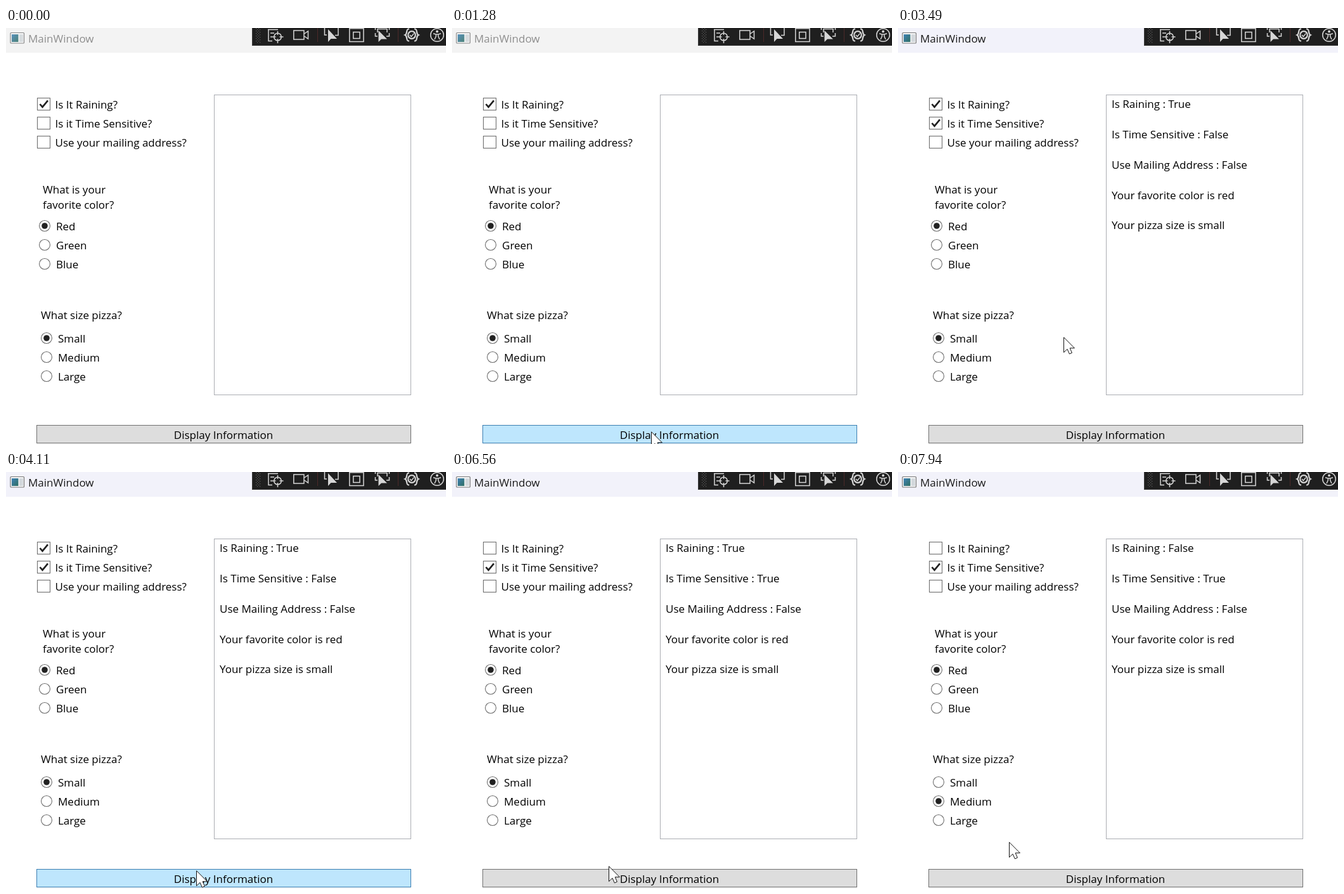
Animation, 694 px wide and 656 px high, one loop 8000 ms. Source, as an HTML page:

```html
<!DOCTYPE html>
<html lang="en">
<head>
<meta charset="utf-8">
<title>Window demo</title>
<style>
  html, body { margin: 0; width: 100%; height: 100%; overflow: hidden; background: #fff; }
  svg { display: block; width: 694px; height: 656px; }
  text { font: 17px "Open Sans", "Noto Sans", sans-serif; fill: #000; white-space: pre; }
  .line { fill: none; stroke: #d6d6d6; stroke-width: 1.5; }
  .bold { stroke-width: 2.2; }
  .solid { fill: #d6d6d6; }
  .box { fill: #fff; stroke: #707070; stroke-width: 1.1; }
  .hover .box { fill: #f3f9ff; stroke: #5593ff; }
  .press .box { fill: #d9ecff; stroke: #3c77dd; }
  .tick { fill: none; stroke: #212121; stroke-width: 2.7; }
  .dot { fill: #212121; }
  #button rect { fill: #ddd; stroke: #707070; }
  #button.hover rect { fill: #bee6fd; stroke: #3c7fb1; }
  #button.press rect { fill: #c4e5f6; stroke: #2c628b; }
</style>
</head>
<body>
<svg viewBox="0 0 694 656">
  <defs>
    <linearGradient id="pane" x1="0" y1="0" x2="1" y2="1">
      <stop offset="0" stop-color="#3f82b5"/><stop offset="1" stop-color="#2f6e62"/>
    </linearGradient>
    <pattern id="grip" width="4" height="4" patternUnits="userSpaceOnUse" x="394" y="0">
      <rect width="1.2" height="1.2" fill="#5c5c5c"/><rect x="2" y="2" width="1.2" height="1.2" fill="#5c5c5c"/>
    </pattern>
  </defs>
  <rect width="694" height="656" fill="#fff"/>
  <rect id="bar" width="694" height="39"/>
  <g id="icon">
    <rect x="7" y="7.5" width="21.5" height="16.5" rx="1" fill="#fafafa" stroke="#777" stroke-width="1.2"/>
    <rect x="9" y="10" width="10.5" height="12" fill="url(#pane)"/>
    <rect x="21" y="10" width="6" height="12" fill="#d3d8dc"/>
  </g>
  <text id="title" x="35" y="23">MainWindow</text>

  <g id="tools">
    <rect x="388.5" y="-1" width="310" height="28.5" fill="#1f1f1f" stroke="#3a3a3a"/>
    <rect x="394" width="8" height="24" fill="url(#grip)"/>
    <path d="M491.5 0V22M618.5 0V22" stroke="#4c2929"/>
    <path class="line" d="M413 2.5H429M414 2V20.5H420M417 8H423M417 14H420M428.5 5V11M428.5 17V24M419.5 14H425.5M431.5 14H437.5"/>
    <circle class="line" cx="428.5" cy="14" r="5.8"/>
    <path class="line" d="M453.8 4H470V18H453.8ZM470.5 9L476.5 5V17L470.5 13"/>
    <path class="line" d="M506 11H502.5V0M524 0V11.5H519"/>
    <path class="solid" d="M508 2V22L512.5 17H522Z"/>
    <path class="line" d="M541.8 .8H564V21.5H541.8ZM547.8 6.5H558V16.5H547.8Z"/>
    <path class="line" d="M582.5 0V3M582.5 8V13H586M604.5 0V3M604.5 8V13H600M586 7V1.5H601V7"/>
    <path class="solid" d="M587.5 4V22L592 17.5H601Z"/>
    <path class="line bold" d="M636 1.5C630 1 634 9 629.5 11C634 13 630 21 636 20.5M644 1.5C650 1 646 9 650.5 11C646 13 650 21 644 20.5"/>
    <circle class="line bold" cx="640" cy="11" r="5.8"/>
    <path class="line" d="M637 11L639.3 13.5L643.3 8.6"/>
    <circle class="line" cx="680" cy="11" r="10.3"/>
    <circle class="solid" cx="680" cy="5.5" r="1.9"/>
    <path class="line" d="M674 8.7L678.3 10V13L676 18M686 8.7L681.7 10V13L684 18M678 10H682"/>
  </g>

  <rect x="328.5" y="105.5" width="310" height="473" fill="#fff" stroke="#abadb3"/>
  <g id="output"></g>
  <text x="58" y="261">What is your</text>
  <text x="58" y="285">favorite color?</text>
  <text x="55" y="459">What size pizza?</text>
  <g id="options"></g>
  <g id="button">
    <rect x="48.5" y="626.5" width="590" height="28"/>
    <text x="343" y="648" text-anchor="middle">Display Information</text>
  </g>
  <path id="cursor" fill="#fff" stroke="#111" d="M.5 .8V24.6L6 19.4L9.4 27L13.4 25.2L10.2 17.8H17.4Z"/>
</svg>
<script>
const LOOP = 8000, STEP = 75, ROW = 30;
const $ = id => document.getElementById(id);

function add(parent, tag, attrs, text) {
  const el = document.createElementNS("http://www.w3.org/2000/svg", tag);
  for (const k in attrs) el.setAttribute(k, attrs[k]);
  if (text) el.textContent = text;
  return parent.appendChild(el);
}

// Where the pointer goes: x, y, time it arrives, time it leaves
const stops = [
  { x: 500, y: 130, at: 440 },
  { x: 314, y: 636, at: 1280, until: 1890 },
  { x: 266, y: 559, at: 2050 },
  { x: 153, y: 169, at: 2350, until: 2580 },
  { x: 156, y: 152, at: 2900, until: 3070 },
  { x: 261, y: 487, at: 3490 },
  { x: 300, y: 628, at: 3880, until: 4800 },
  { x: 190, y: 439, at: 4880 },
  { x: 107, y: 110, at: 5570, until: 5760 },
  { x: 247, y: 621, at: 6560 },
  { x: 254, y: 631, at: 6800, until: 7000 },
  { x: 129, y: 510, at: 7560, until: 7710 },
  { x: 175, y: 583, at: 7940 }
];

function pointer(t) {
  const i = stops.findLastIndex(s => s.at <= t);
  if (i < 0) return null;
  const a = stops[i], b = stops[i + 1], leave = a.until ?? a.at;
  if (!b || t < leave) return [a.x, a.y];
  const n = Math.max(1, Math.round((b.at - leave) / STEP));
  const p = Math.floor((t - leave) / (b.at - leave) * n) / n;
  return [a.x + (b.x - a.x) * p, a.y + (b.y - a.y) * p];
}

function option(round, x, y, textX, label) {
  const g = add($("options"), "g", {});
  let mark;
  if (round) {
    add(g, "circle", { class: "box", cx: x, cy: y, r: 8.5 });
    mark = add(g, "circle", { class: "dot", cx: x, cy: y, r: 4.8 });
  } else {
    add(g, "rect", { class: "box", x: x - 10, y: y - 9.5, width: 20, height: 19 });
    mark = add(g, "path", { class: "tick", d: `M${x - 6} ${y}l4 4.7l8.5 -10.3` });
  }
  const text = add(g, "text", { x: textX, y: Math.floor(y + 7) }, label);
  const right = textX + text.getComputedTextLength();
  return { g, mark, area: [x - 10, y - 12, right, y + 12] };
}

const group = (round, x, y, textX, ...labels) =>
  labels.map((label, i) => option(round, x, y + i * ROW, textX, label));

const checks = group(false, 59.5, 120, 77.5, "Is It Raining?", "Is it Time Sensitive?", "Use your mailing address?");
const colors = group(true, 61, 312, 79, "Red", "Green", "Blue");
const sizes = group(true, 64, 489, 82, "Small", "Medium", "Large");
const options = [...checks, ...colors, ...sizes];
const lines = Array.from({ length: 5 }, (_, i) =>
  add($("output"), "text", { x: 337, y: Math.round(126 + i * 47.85) }));

// What is chosen at a given time
const chosen = t => ({ checks: [t < 5720, t >= 3070, false], color: 0, size: t < 7860 ? 0 : 1 });

// Each release of the button prints the choices made so far
const clicks = [1730, 4490, 6950], HOLD = 150;
const yes = on => on ? "True" : "False";

function report(t) {
  const last = clicks.findLast(c => c <= t);
  if (!last) return [];
  const { checks: [rain, time, mail], color, size } = chosen(last);
  return [
    "Is Raining : " + yes(rain),
    "Is Time Sensitive : " + yes(time),
    "Use Mailing Address : " + yes(mail),
    "Your favorite color is " + ["red", "green", "blue"][color],
    "Your pizza size is " + ["small", "medium", "large"][size]
  ];
}

const inside = (p, [l, t, r, b]) => p && p[0] >= l && p[0] <= r && p[1] >= t && p[1] <= b;
const setState = (el, hover, press) => el.setAttribute("class", press ? "press" : hover ? "hover" : "");

function draw(t) {
  const tip = pointer(t), now = chosen(t);
  const active = t >= clicks[0] - HOLD;
  $("cursor").style.display = tip ? "" : "none";
  if (tip) $("cursor").setAttribute("transform", `translate(${tip.map(Math.round)})`);
  $("bar").style.fill = active ? "#f2f2fa" : "#f3f3f3";
  $("title").style.fill = active ? "#1a1a1a" : "#8e8e8e";
  $("icon").style.opacity = active ? 1 : .85;

  setState($("button"), inside(tip, [48, 626, 639, 655]), clicks.some(c => t >= c - HOLD && t < c));
  for (const o of options) setState(o.g, inside(tip, o.area), o === checks[1] && t >= 2900 && t < 3070);

  const show = (o, on) => o.mark.style.display = on ? "" : "none";
  checks.forEach((o, i) => show(o, now.checks[i]));
  colors.forEach((o, i) => show(o, i === now.color));
  sizes.forEach((o, i) => show(o, i === now.size));

  const words = report(t);
  lines.forEach((el, i) => el.textContent = words[i] ?? "");
}

const start = performance.now();
function tick() {
  draw((performance.now() - start) % LOOP);
  requestAnimationFrame(tick);
}
tick();
</script>
</body>
</html>
```
